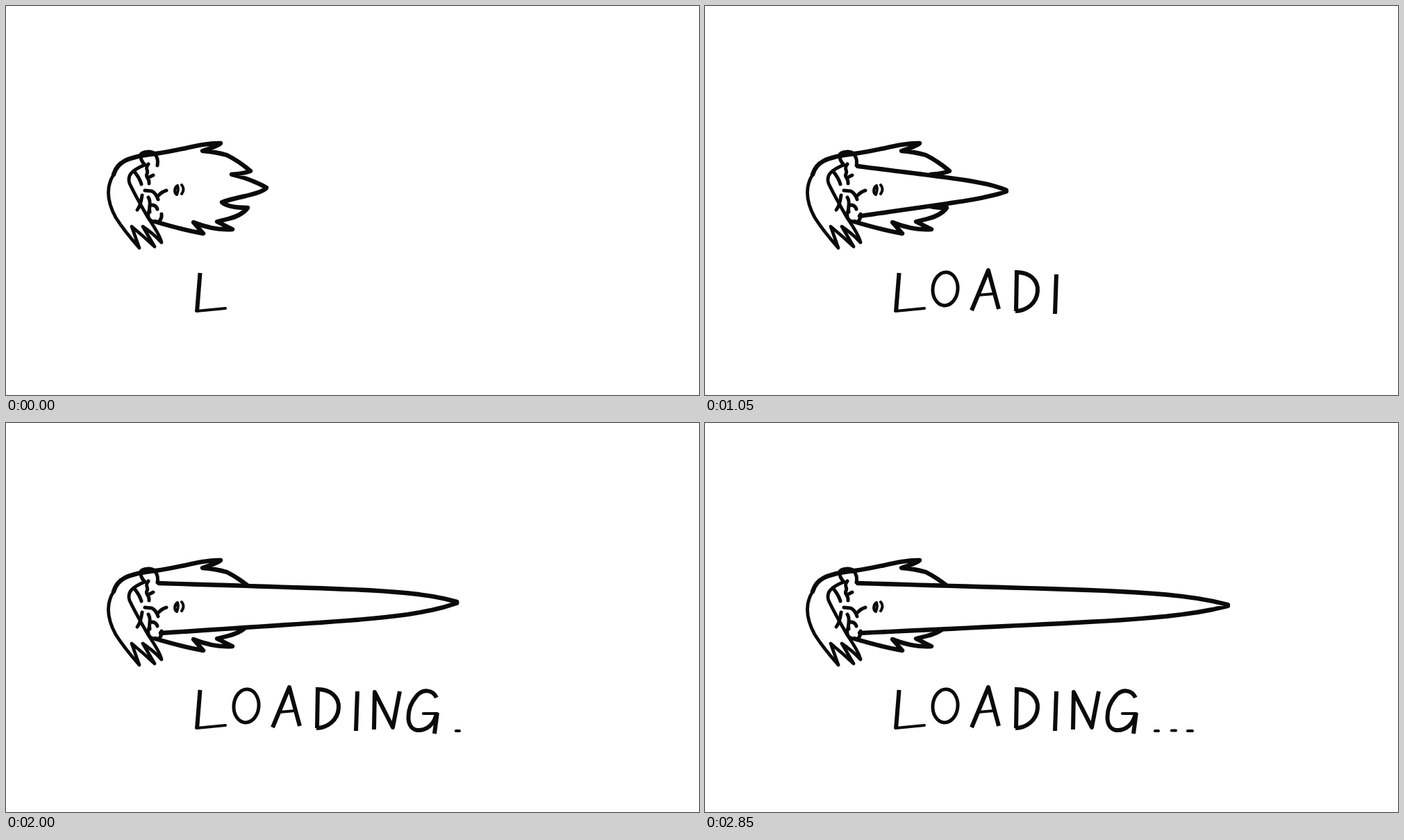
Recreate the animation shown at these times as an HTML page. Size 998 by 561 pixels, loop 2.9 s.

```html
<!DOCTYPE html>
<html lang="en">
<head>
<meta charset="utf-8">
<title>Loading</title>
<style>
  html, body { margin: 0; width: 100%; height: 100%; overflow: hidden; background: #fff; }
  svg { display: block; width: 998px; height: 561px; }
  path, ellipse { fill: none; stroke: #0a0a0a; stroke-width: 5; stroke-linecap: round; stroke-linejoin: round; }
  .hair path, #beak { stroke-width: 6.4; }
  .hair .fringe { stroke-width: 4.8; }
  .face .nostril { stroke-width: 4; }
  #beak { fill: #fff; }
  #word path { stroke-width: 6; stroke-linecap: butt; }
  #word .thin { stroke-width: 4.2; stroke-linecap: round; }
</style>
</head>
<body>
<svg viewBox="0 0 998 561" role="img" aria-label="LOADING...">
  <g class="hair">
    <path d="M155 243C160 226 172 218 215 213C250 209 282 197 309 198Q305 202 283 209Q300 210 318 215Q336 224 352 238Q346 241 325 243Q355 250 375 262Q374 267 345 274Q322 279 311 283Q320 291 348 291Q340 302 320 307L304 311L326 322Q300 324 270 312L284 328Q255 323 215 311"/>
    <path class="fringe" d="M155 243C143 262 146 283 158 305Q170 324 192 349L181 318Q198 332 214 347L197 318Q212 328 224 341Q222 331 205 306Q186 273 178 256C174 244 181 237 200 229"/>
  </g>
  <path id="beak"/>
  <g class="face">
    <path d="M200 229Q193 222 194 214C197 209 210 209 214 213Q220 220 218 230"/>
    <path d="M184 238Q192 247 195 257"/>
    <path d="M205 228C199 235 206 237 203 242C200 247 207 248 206 256M204 248L212 244"/>
    <path d="M200 266L210 267Q216 270 219 279M219 274Q224 268 231 266"/>
    <path d="M196 273Q194 288 189 294"/>
    <path d="M205 276C210 283 205 290 207 297M207 287Q216 286 218 293"/>
    <path d="M206 295C202 306 208 311 215 311M224 300Q225 307 219 312"/>
    <path class="nostril" d="M247 259C242 262 242 270 246 272Q249 265 247 259M253 258Q258 264 253 271"/>
  </g>
  <g id="word">
    <g><path d="M279.5 385L275 441"/><path class="thin" d="M274.5 440L316 436"/></g>
    <g><ellipse cx="346" cy="408" rx="18" ry="24" transform="rotate(5 346 408)"/></g>
    <g><path d="M384 439L408 381L423 437"/><path class="thin" d="M393 417L416 415"/></g>
    <g><path d="M449 382L448 440"/><path d="M446 384C468 383 480 396 479 411C478 429 462 440 447 440"/></g>
    <g><path d="M506 387L504 444"/></g>
    <g><path d="M530 442L531 388L557 439L567 387"/></g>
    <g><path d="M620 396C614 384 600 383 591 394C576 412 575 440 592 443C606 444 617 434 620 419"/><path class="thin" d="M601 419L621 419"/><path d="M621 418L617 448"/></g>
    <g><path class="thin" d="M648 444h5"/></g>
    <g><path class="thin" d="M672 443.5h6"/></g>
    <g><path class="thin" d="M695 444h7"/></g>
  </g>
</svg>
<script>
  const LOOP = 2900, STEP = 50, SEGMENTS = 24;
  const beak = document.getElementById('beak');
  const glyphs = [...document.getElementById('word').children];
  const shownAt = [0, 200, 400, 800, 1050, 1250, 1500, 1800, 2150, 2550];

  // the beak's tip: time, x, y
  const tipKeys = [
    [50, 285, 267], [750, 381, 267], [1300, 478, 266],
    [1650, 575, 262], [2300, 713, 256], [2700, 753, 263]
  ];

  const mix = (a, b, k) => a + (b - a) * k;
  const clamp = v => Math.min(1, Math.max(0, v));

  function tipAt(t) {
    const i = Math.max(1, tipKeys.findIndex(key => key[0] >= t));
    if (t >= LOOP || t > tipKeys[tipKeys.length - 1][0]) return tipKeys[tipKeys.length - 1];
    const a = tipKeys[i - 1], b = tipKeys[i];
    const k = clamp((t - a[0]) / (b[0] - a[0]));
    return a.map((v, j) => mix(v, b[j], k));
  }

  // one side from cheek to tip; bulge 0 is straight, more keeps the beak wide until its end
  function edge(x0, y0, x1, y1, bulge) {
    return Array.from({ length: SEGMENTS + 1 }, (_, i) => {
      const f = i / SEGMENTS;
      const y = mix(y0, y1, mix(f, f ** 8, bulge));
      return mix(x0, x1, f).toFixed(1) + ' ' + y.toFixed(1);
    });
  }

  function beakPath(t) {
    const [, x, y] = tipAt(t);
    const grown = clamp((t - 750) / 700);
    const top = edge(220, 231, x, y - 1, 0.5 * grown);
    const low = edge(223, 303, x, y + 1, 0.35 * grown).reverse();
    return 'M' + [...top, ...low].join('L');
  }

  function draw(now) {
    const t = Math.floor((now % LOOP) / STEP) * STEP;
    beak.setAttribute('d', t >= tipKeys[0][0] ? beakPath(t) : '');
    glyphs.forEach((g, i) => { g.style.display = t >= shownAt[i] ? '' : 'none'; });
  }

  const start = performance.now();
  function tick() {
    draw(performance.now() - start);
    requestAnimationFrame(tick);
  }
  draw(0);
  requestAnimationFrame(tick);
</script>
</body>
</html>
```
